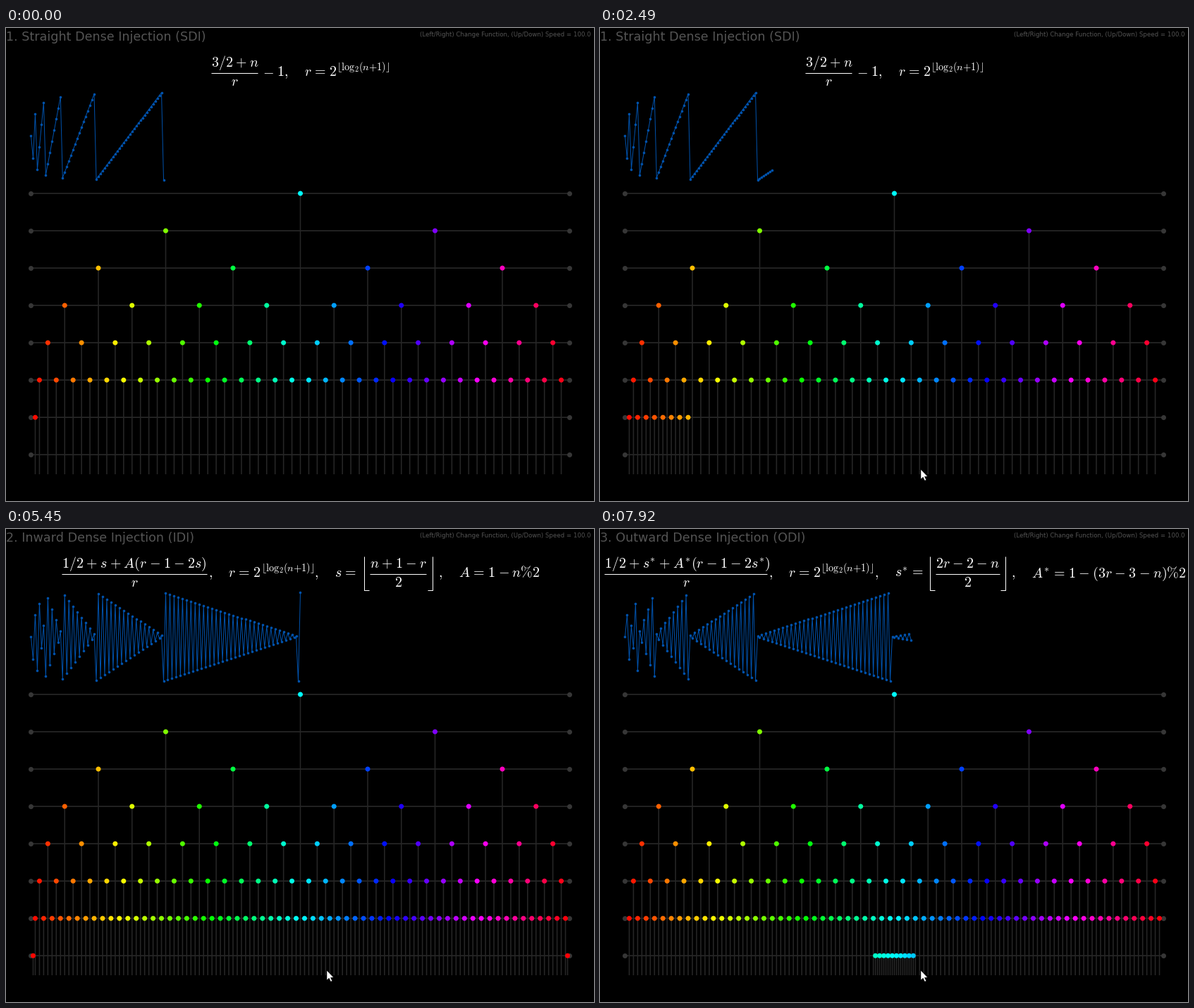
Animation, 834 px wide and 672 px high, one loop 8000 ms. Source, as a matplotlib script:

```python
import matplotlib.pyplot as plt
import numpy as np
from matplotlib.animation import FuncAnimation
from matplotlib.collections import LineCollection
from matplotlib.colors import hsv_to_rgb
from matplotlib.patches import Circle, Polygon

W, H, DPI = 834, 672, 96
STEPS, LOOP_MS = 84, 8000
PT = 72 / DPI                      # points per pixel
LEFT, SPAN = 36, 764
TOP_ROW, ROW_GAP, ROWS = 235.5, 53.03, 8
FOOT = 634.5
GRAPH_MID, GRAPH_HEIGHT = 153.8, 127
PER_STEP, START, PERIOD = 10.134, 64, 256
SWITCHES = (38, 66)                # steps at which the next function begins
CLICK_STEP = 37
BASE, EM = 69, 20                  # formula baseline and font size in pixels

plt.rcParams["font.family"] = "DejaVu Sans"
plt.rcParams["mathtext.fontset"] = "cm"

fig = plt.figure(figsize=(W / DPI, H / DPI), dpi=DPI, facecolor="black")
ax = fig.add_axes([0, 0, 1, 1])
ax.set_xlim(0.5, W + 0.5)
ax.set_ylim(H + 0.5, 0.5)
ax.axis("off")


# ---- the three injections -------------------------------------------------

def straight(n, r):
    return (1.5 + n) / r - 1


def inward(n, r):
    s = (n + 1 - r) // 2
    a = 1 - n % 2
    return (0.5 + s + a * (r - 1 - 2 * s)) / r


def outward(n, r):
    s = (2 * r - 2 - n) // 2
    a = 1 - (3 * r - 3 - n) % 2
    return (0.5 + s + a * (r - 1 - 2 * s)) / r


index = np.arange(PERIOD - 1)
level = np.floor(np.log2(index + 1)).astype(int)
values = [f(index, 2 ** level) for f in (straight, inward, outward)]
graph_x = LEFT + index * SPAN / PERIOD
row_y = TOP_ROW + ROW_GAP * level


# ---- titles and formulas --------------------------------------------------

def label(x, y, text, size, **kw):
    kw = {"color": "#545454", "va": "baseline", **kw}
    return ax.text(x, y, text, fontsize=size * PT, **kw)


def math(x, y, tex, size=EM, **kw):
    return label(x, y, f"${tex}$", size, color="white", **kw)


def spaced(tex):
    """Widen the gaps round operators to those of TeX."""
    for sign, gap in (("+", 0.05), ("-", 0.05), ("=", 0.117)):
        space = r"\hspace{%s}" % gap
        tex = tex.replace(sign, space + sign + space)
    return tex


def stroke(xs, ys):
    return ax.plot(xs, ys, color="white", lw=PT, solid_capstyle="butt")[0]


def fraction(x0, x1, top, bottom):
    return [
        math(x0, BASE - 13.5, spaced(top)),
        stroke([x0, x1], [64, 64]),
        math((x0 + x1) / 2, BASE + 13.7, bottom, ha="center"),
    ]


def power(x):
    return [
        math(x, BASE, spaced("r=2")),
        math(x + 46.4, BASE - 8,
             r"\lfloor\mathrm{log}_2(n{+}1)\rfloor", EM * 0.72),
    ]


def floors(x0, x1):
    return [stroke([x0, x0, x0 + 7], [39, 87, 87]),
            stroke([x1, x1, x1 - 7], [39, 87, 87])]


def plain(*parts):
    return [math(x, BASE, spaced(tex)) for x, tex in parts]


def title(text):
    return [label(0.5, 19, text, 17.5)]


groups = [
    title("1. Straight Dense Injection (SDI)")
    + fraction(291.5, 358, "3/2+n", "r")
    + [math(364.8, BASE, "-")]
    + plain((384.8, "1,"))
    + power(423.6),

    title("2. Inward Dense Injection (IDI)")
    + fraction(80, 286, "1/2+s+A(r-1-2s)", "r")
    + power(316)
    + floors(509, 606)
    + fraction(517, 597, "n+1-r", "2")
    + plain((288, ","), (438, ","), (467, "s="), (614, ","),
            (643, r"A=1-n\%2")),

    title("3. Outward Dense Injection (ODI)")
    + fraction(7, 238, "1/2+s^{*}+A^{*}(r-1-2s^{*})", "r")
    + power(267.5)
    + floors(469, 576)
    + fraction(477, 568, "2r-2-n", "2")
    + plain((240, ","), (390, ","), (419, "s^{*}="), (584, ","),
            (613, r"A^{*}=1-(3r-3-n)\%2")),
]

label(830.5, 13, "(Left/Right) Change Function, (Up/Down) Speed = 100.0", 8.65,
      ha="right")


# ---- rows, graph and dots -------------------------------------------------

for k in range(ROWS):
    y = TOP_ROW + ROW_GAP * k
    ax.plot([LEFT, LEFT + SPAN], [y, y], color="#2a2a2a", lw=1.6 * PT,
            snap=False, zorder=1)
    ax.plot([LEFT, LEFT + SPAN], [y, y], "o", color="#363636", ms=7 * PT,
            mew=0, zorder=2)

# light edge along the bottom of the window
ax.plot([0, W + 1], [H, H], color="#d0d0d0", lw=PT, zorder=1)

stems = LineCollection([], colors="#262626", linewidths=1.6 * PT, zorder=1.5)
stems.set_snap(False)
ax.add_collection(stems, autolim=False)
dots = ax.scatter([], [], s=(7 * PT) ** 2, linewidths=0, zorder=3)
graph, = ax.plot([], [], "-o", color="#0052ac", lw=PT, ms=3.6 * PT, mew=0,
                 zorder=3)


# ---- mouse pointer --------------------------------------------------------

ARROW = np.array([(0, 0), (0, 14), (3.2, 11.2), (5.6, 16.2), (7.8, 15.2),
                  (5.5, 10.4), (9.6, 10)])
pointer = Polygon(ARROW, closed=True, fc="white", ec="black", lw=0.5 * PT,
                  zorder=5)
halo = Circle((454.5, 628), 12.7, fc="yellow", alpha=0.5, lw=0, zorder=6)
ax.add_patch(pointer)
ax.add_patch(halo)


def draw(step):
    which = sum(step >= s for s in SWITCHES)
    count = int(START + PER_STEP * step) % PERIOD

    for i, group in enumerate(groups):
        for item in group:
            item.set_visible(i == which)

    f = values[which][:count]
    x, y = LEFT + SPAN * f, row_y[:count]
    graph.set_data(graph_x[:count], GRAPH_MID - GRAPH_HEIGHT * (f - 0.5))
    stems.set_segments([[(a, b), (a, FOOT)] for a, b in zip(x, y)])
    dots.set_offsets(np.column_stack([x, y]))
    full = np.ones_like(f)
    dots.set_facecolors(hsv_to_rgb(np.column_stack([f, full, full])))

    # the pointer slides in from the lower edge and settles
    ease = 1 - (1 - np.clip((step - 5) / 5, 0, 1)) ** 3
    pointer.set_xy(ARROW + (448 + 7.5 * ease, 673 - 45.5 * ease))
    pointer.set_visible(step > 5)
    halo.set_visible(step == CLICK_STEP)
    return []


anim = FuncAnimation(fig, draw, frames=STEPS, interval=LOOP_MS / STEPS,
                     init_func=lambda: draw(0), repeat=True, repeat_delay=0,
                     blit=False)
plt.show()
```
